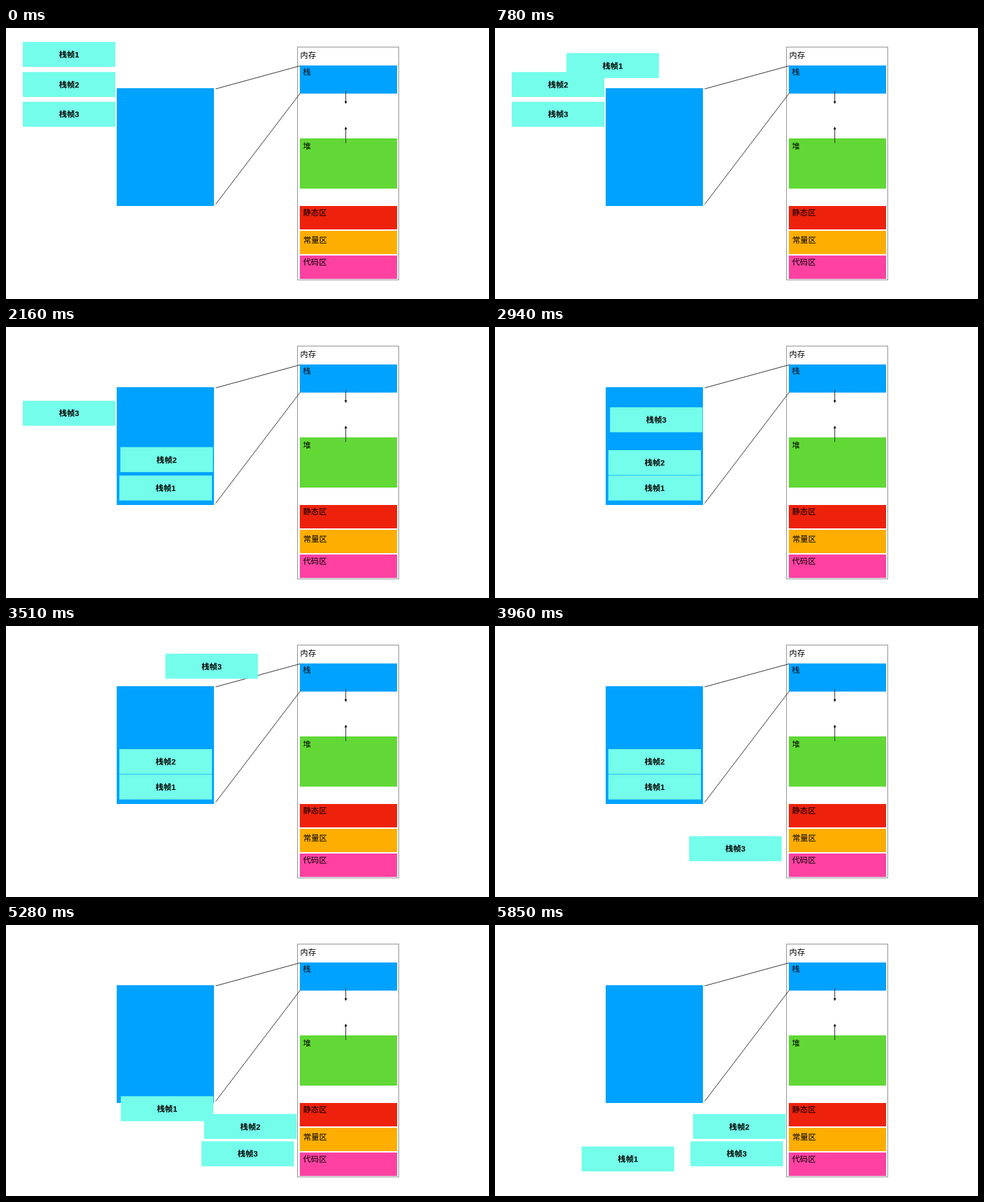
Write an HTML page that moves like this. It is 720 by 405 pixels and loops after 6.33 s.

```html
<!DOCTYPE html>
<html lang="zh-CN">
<head>
<meta charset="utf-8">
<title>栈帧</title>
<style>
html, body { margin: 0; width: 100%; height: 100%; overflow: hidden; background: #fff; }
svg { display: block; width: 720px; height: 405px; }
text { font: 11.8px "Liberation Sans", "Noto Sans CJK SC", "Noto Sans CJK", sans-serif; }
.block text { font-weight: bold; text-anchor: middle; }
.block rect { fill: #73fdea; }
.line { stroke: #333; fill: none; }
</style>
</head>
<body>
<svg id="stage" viewBox="0 0 720 405">
  <rect x="165" y="90" width="145" height="176" fill="#00a2ff"/>
  <rect x="434.5" y="28.5" width="151" height="348" fill="#fff" stroke="#929292"/>
  <text x="438.6" y="45.2">内存</text>
  <g id="areas"></g>
  <path class="line" d="M312.5 91L438.5 56.5M312.5 263.5L438.5 97.5"/>
  <path class="line" d="M506.5 94V110M506.5 172V151"/>
  <path d="M504.5 109.5h4l-2 4zM504.5 151.5h4l-2-4z"/>
</svg>
<script>
const stage = document.getElementById('stage');
const areas = document.getElementById('areas');

function add(parent, tag, attrs, text = '') {
  const el = document.createElementNS('http://www.w3.org/2000/svg', tag);
  for (const key in attrs) el.setAttribute(key, attrs[key]);
  el.textContent = text;
  return parent.appendChild(el);
}

// name, top, height, colour, text x, baseline
for (const [name, y, height, fill, x, base] of [
  ['栈', 56, 42, '#00a2ff', 442.6, 70.2],
  ['堆', 165, 75, '#61d836', 442.8, 181.2],
  ['静态区', 266, 35, '#ee220c', 442.8, 279.8],
  ['常量区', 303, 35, '#feae00', 443.2, 321.4],
  ['代码区', 340, 35, '#ff42a1', 442.8, 354.4],
]) {
  add(areas, 'rect', { x: 438, y, width: 145, height, fill });
  add(areas, 'text', { x, y: base }, name);
}

const blocks = [1, 2, 3].map(n => {
  const g = add(stage, 'g', { class: 'block' });
  add(g, 'rect', { width: 138, height: 37.3 });
  add(g, 'text', { x: 69, y: 23.2 }, '栈帧' + n);
  return g;
});

// Push 1, 2, 3, then pop 3, 2, 1; each path is followed by a block's top left corner.
const moves = [
  [0, 'M25 20.8C165 21 204 135 169 222'],
  [1, 'M25 65.8C95 15 196 108 169 184'],
  [2, 'M25 110.3C48 -5 195 73 169 146.2'],
  [2, 'M169 146.2C143 95 172 41 228 41C355 41 268 235 291.3 323.3'],
  [1, 'M169 184C100 130 140 33 205 33C255 33 297 150 295.2 282.4'],
  [0, 'M169 222C181 262 155 311 129.2 331'],
].map(([n, d]) => {
  const path = document.createElementNS('http://www.w3.org/2000/svg', 'path');
  path.setAttribute('d', d);
  return { block: blocks[n], path, length: path.getTotalLength() };
});

const LOOP = 6330, STEP = 30, START = 480, MOVE = 900;

// cubic-bezier(.42, 0, .58, 1)
function ease(x) {
  let lo = 0, hi = 1;
  for (let i = 0; i < 24; i++) {
    const s = (lo + hi) / 2, r = 1 - s;
    if (1.26 * s * r * r + 1.74 * s * s * r + s ** 3 < x) lo = s; else hi = s;
  }
  return lo * lo * (3 - 2 * lo);
}

function draw(now) {
  const time = Math.floor(now % LOOP / STEP) * STEP;
  moves.forEach(({ block, path, length }, i) => {
    const part = (time + STEP - START - i * MOVE) / MOVE;
    if (part <= 0 && i > 2) return;
    const p = path.getPointAtLength(length * ease(Math.min(1, Math.max(0, part))));
    block.setAttribute('transform', `translate(${p.x} ${p.y})`);
  });
}

const begin = performance.now();
function tick() {
  draw(performance.now() - begin);
  requestAnimationFrame(tick);
}
tick();
</script>
</body>
</html>
```
